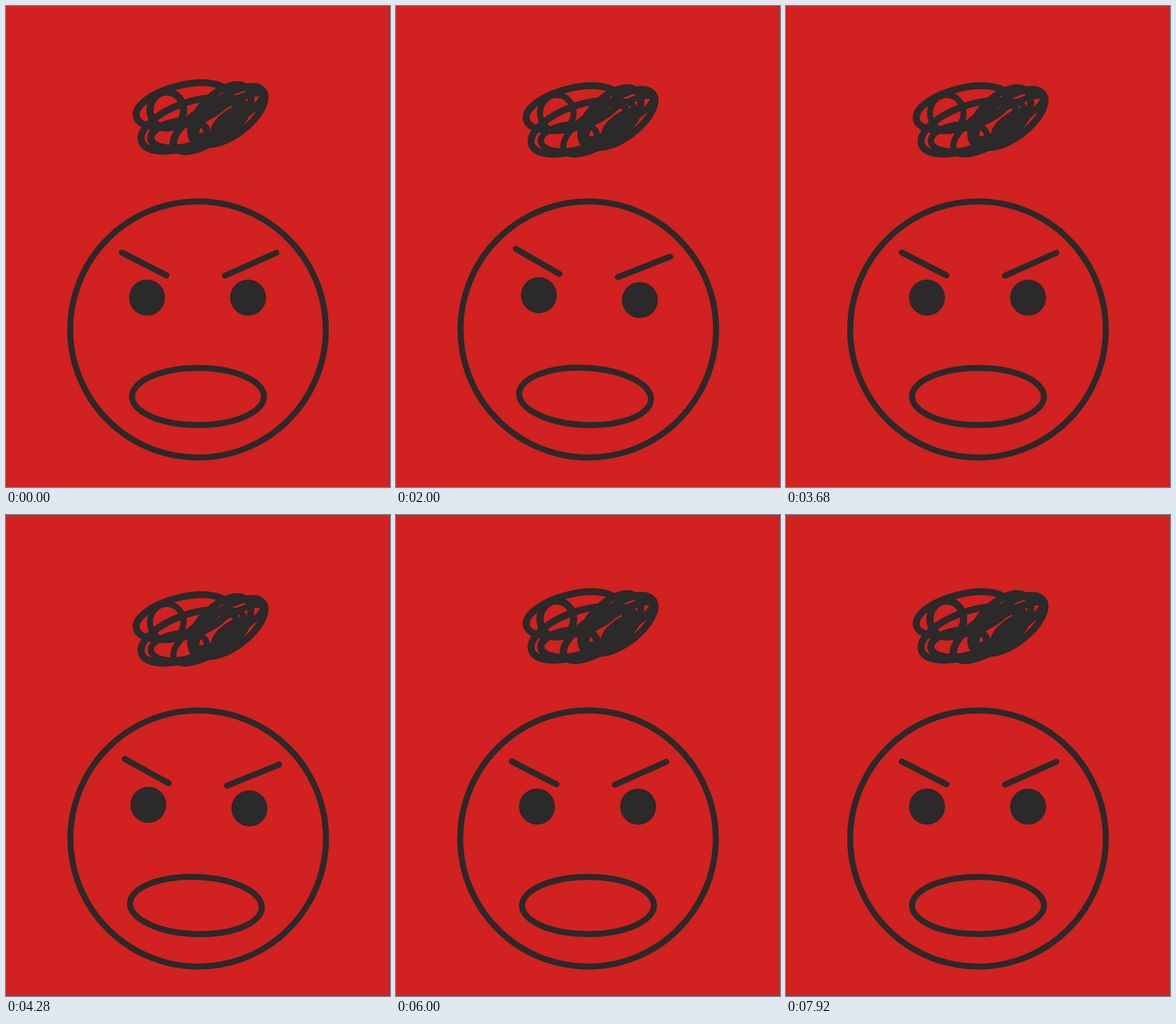
Write an HTML page that moves like this. It is 640 by 800 pixels and loops after 8 s.

```html
<!DOCTYPE html>
<html lang="en">
<head>
<meta charset="utf-8">
<title>Angry face</title>
<style>
  html, body { margin: 0; width: 100%; height: 100%; overflow: hidden; background: #d12120; }
  svg { display: block; width: 100%; height: 100%; }
  .line { fill: none; stroke: #2b2929; stroke-width: 10; stroke-linecap: round; }
  .outer { stroke-width: 11.5; }
  .solid { fill: #2b2929; }
</style>
</head>
<body>
<svg viewBox="0 0 640 800">
  <g id="scribble" class="line">
    <g class="outer">
      <ellipse rx="79" ry="33" transform="translate(294 170) rotate(-14)"/>
      <ellipse rx="84" ry="36" transform="translate(305 202) rotate(-20)"/>
      <ellipse rx="62" ry="34" transform="translate(358 186) rotate(-45)"/>
      <ellipse rx="68" ry="32" transform="translate(374 187) rotate(-37)"/>
    </g>
    <g id="inner">
      <ellipse rx="28" ry="30" transform="translate(268 178)"/>
      <ellipse rx="47" ry="22" transform="translate(288 219) rotate(-8)"/>
      <ellipse rx="68" ry="28" transform="translate(338 203) rotate(-33)"/>
      <ellipse rx="68" ry="16" transform="translate(369 186) rotate(-30)"/>
      <ellipse class="solid" rx="32" ry="12" transform="translate(374 196) rotate(-36)"/>
    </g>
  </g>
  <g id="head" class="line">
    <circle cx="320" cy="538" r="213"/>
    <path d="M193 410 267.5 448M365 448.5 450.5 410.5"/>
    <ellipse cx="320" cy="649.5" rx="110" ry="47.5"/>
    <g class="solid" stroke="none">
      <circle cx="235" cy="485" r="30"/>
      <circle cx="403.5" cy="485" r="30"/>
    </g>
  </g>
</svg>
<script>
  const LOOP = 8000, STEP = 40;
  const [scribble, inner, head] = ['scribble', 'inner', 'head'].map(id => document.getElementById(id));

  // The head leans over and back once per period.
  function tilt(t) {
    const start = 1560, period = 2240, duration = 640, angle = 4;
    if (t < start) return 0;
    const progress = Math.min((t - start) % period / duration, 1);
    return angle * Math.sin(Math.PI * progress) ** 2;
  }

  function draw(time) {
    const t = Math.floor(time % LOOP / STEP) * STEP;
    const raised = t % (3 * STEP) < 2 * STEP;
    scribble.setAttribute('transform', `translate(0 ${raised ? -5 : 0})`);
    inner.style.strokeWidth = raised ? 12 : 10;
    head.setAttribute('transform', `rotate(${tilt(t)} 320 548)`);
  }

  let origin;
  function tick(now) {
    origin ??= now;
    draw(now - origin);
    requestAnimationFrame(tick);
  }
  draw(0);
  requestAnimationFrame(tick);
</script>
</body>
</html>
```
